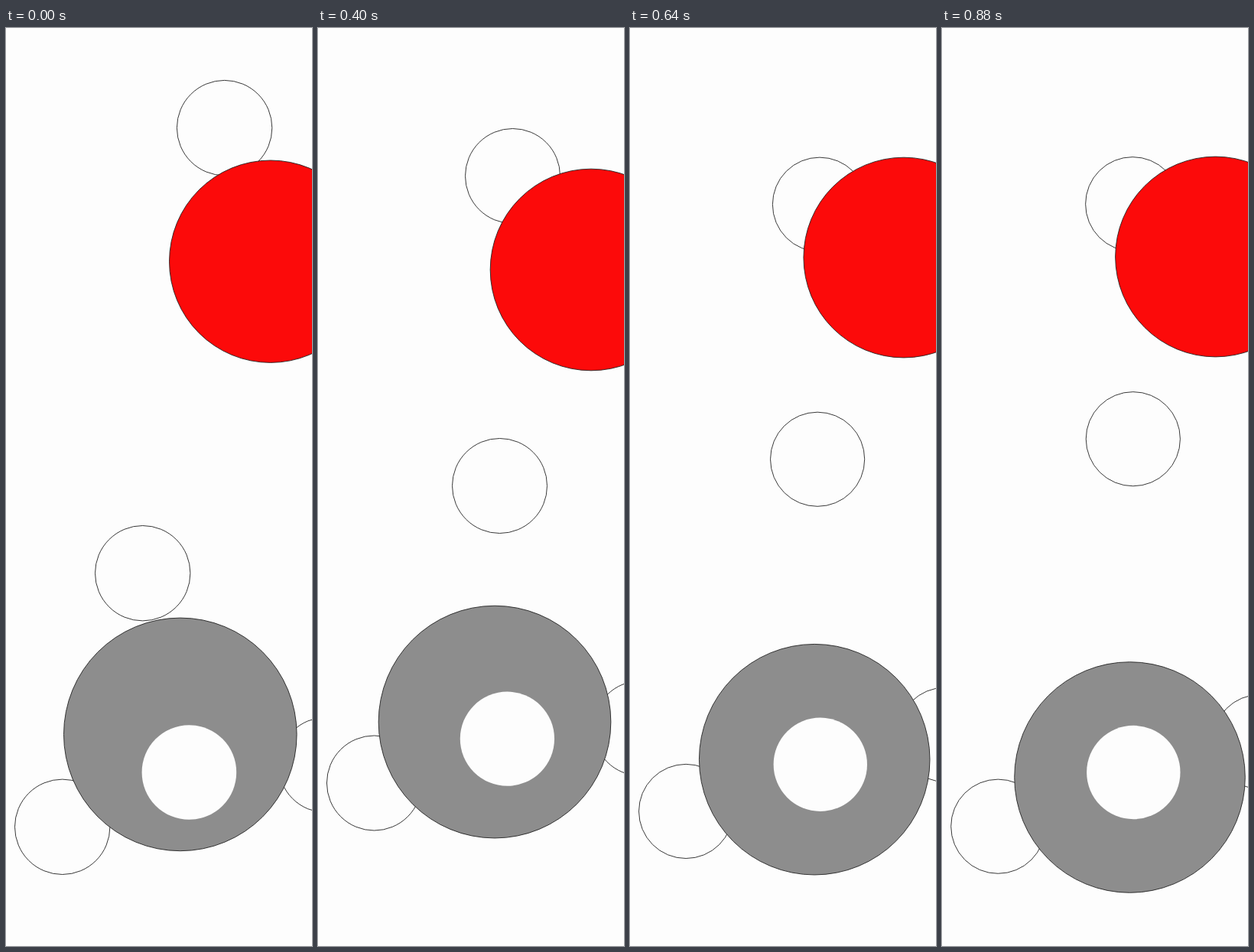
An HTML page without scripts for the animation above (0.92 s loop, 400 by 1200 pixels).

```html
<!DOCTYPE html>
<html lang="en">
<head>
<meta charset="utf-8">
<title>Drifting circles</title>
<style>
  html, body { margin: 0; width: 100%; height: 100%; overflow: hidden; background: #fdfdfd; }
  svg { display: block; width: 100%; height: 100%; }

  circle {
    fill: #fdfdfd;
    stroke: #222;
    stroke-width: .9;
    transform-origin: 0 0;
    animation: drift 920ms infinite;
  }

  /* Shared timing: each circle supplies its own stops, advanced every 40 ms.
     Between b and c everything jumps at once. */
  @keyframes drift {
    0%      { translate: var(--a); scale: 1;    animation-timing-function: steps(5); }
    21.735% { translate: var(--b); scale: 1;    animation-timing-function: steps(1); }
    26.08%  { translate: var(--c); scale: 1; }
    30.43%  { translate: var(--c); scale: 1;    animation-timing-function: steps(3); }
    43.47%  { translate: var(--d); scale: .997; animation-timing-function: steps(4); }
    60.86%  { translate: var(--e); scale: .991; animation-timing-function: steps(4); }
    78.26%  { translate: var(--f); scale: .989; animation-timing-function: steps(4); }
    95.65%, 100% { translate: var(--g); scale: .99; }
  }

  .top {
    --a: 285.6px 130.6px; --b: 279px 135.9px; --c: 247.5px 181.2px; --d: 254.5px 193.5px;
    --e: 246.2px 229.2px; --f: 249.7px 232.2px; --g: 249.2px 230.2px;
  }
  .red {
    fill: #fc0a0a;
    --a: 345.7px 305.2px; --b: 344.8px 305.7px; --c: 351.1px 310.7px; --d: 357px 316px;
    --e: 357.3px 308.7px; --f: 358.3px 291.4px; --g: 357.5px 299px;
  }
  .middle {
    --a: 178.7px 712.7px; --b: 182.7px 681.2px; --c: 226.7px 621.3px; --d: 237.5px 598.5px;
    --e: 243px 571.2px; --f: 247.2px 556.3px; --g: 249.8px 537.2px;
  }
  .left {
    --a: 73.7px 1044.3px; --b: 73.7px 1040.3px; --c: 73.7px 976.8px; --d: 73.5px 987px;
    --e: 73.1px 1014.7px; --f: 73.2px 1033.2px; --g: 73.3px 1043.7px;
  }
  .right {
    --a: 418.5px 963.3px; --b: 417.7px 960.5px; --c: 416.8px 916px; --d: 421.7px 915.5px;
    --e: 410.5px 918px; --f: 413px 929.5px; --g: 415.5px 933px;
  }
  .gray {
    fill: #8d8d8d;
    --a: 227.8px 923.4px; --b: 226.2px 921.5px; --c: 225.7px 877.5px; --d: 231px 907.1px;
    --e: 239.8px 944.4px; --f: 242.6px 968px; --g: 245.5px 979.5px;
  }
  .hole {
    stroke: none;
    --a: 239.4px 973px; --b: 238.2px 970px; --c: 241.2px 921.6px; --d: 247.4px 929.2px;
    --e: 246.4px 955.2px; --f: 251.2px 970.2px; --g: 250.3px 973px;
  }
</style>
</head>
<body>
<svg viewBox="0 0 400 1200" preserveAspectRatio="none">
  <circle class="top" r="62.2"/>
  <circle class="red" r="132.2"/>
  <circle class="middle" r="62.2"/>
  <circle class="left" r="62.2"/>
  <circle class="right" r="62.2"/>
  <circle class="gray" r="152.3"/>
  <circle class="hole" r="61.8"/>
</svg>
</body>
</html>
```
